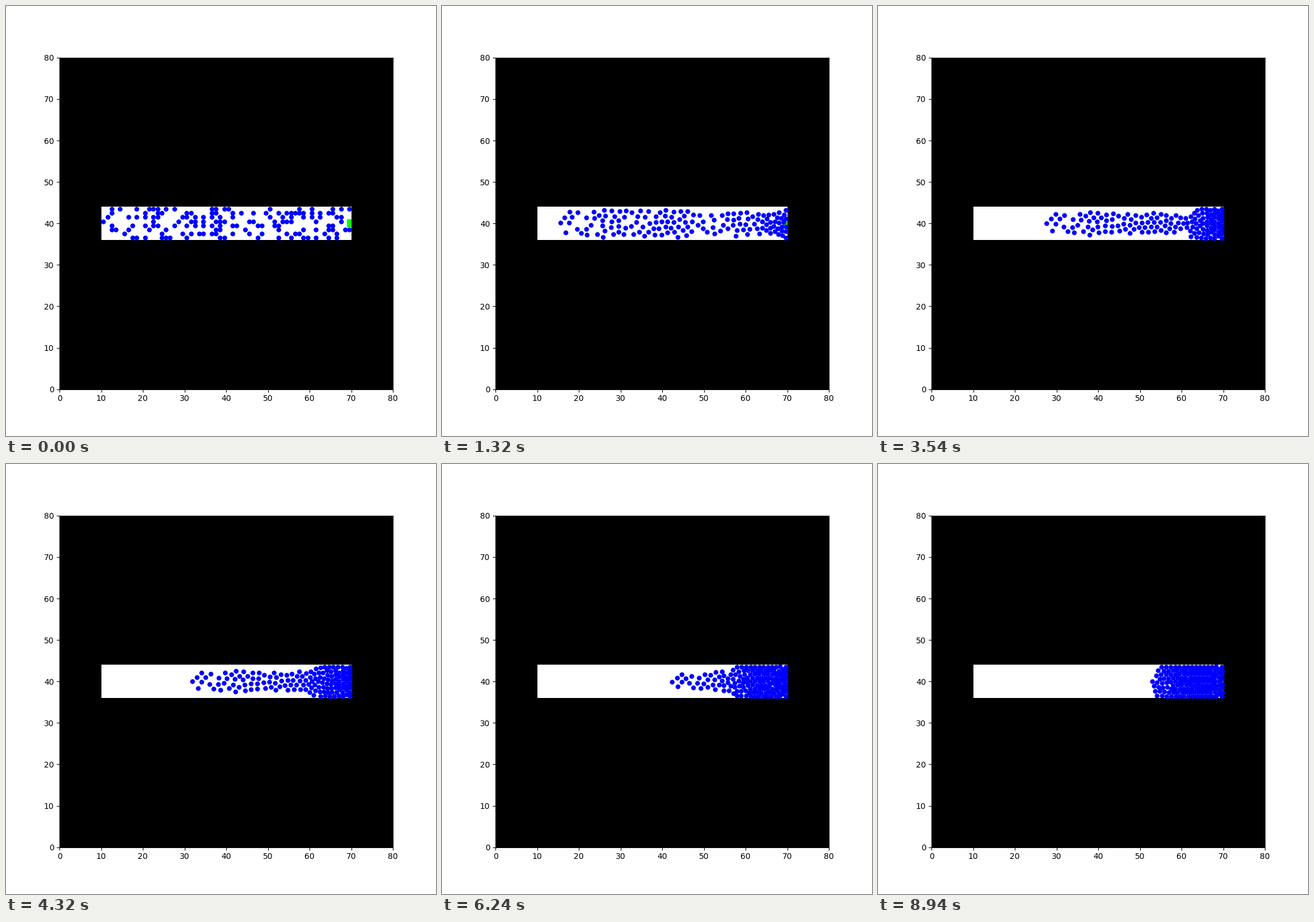
These frames come from a looping animation (748 px wide and 748 px high, 9000 ms). A matplotlib script:

```python
import numpy as np
import matplotlib.pyplot as plt
from matplotlib.animation import FuncAnimation
from matplotlib.patches import Rectangle

SIZE, DPI = 748, 100
FRAMES, INTERVAL, SUBSTEPS = 150, 60, 10
LEFT, RIGHT, BOTTOM, TOP = 10, 70, 36, 44
EXIT = np.array([70.1, 40.0])
SPEED, TAU = 0.331, 6.5          # cells per frame, frames
PUSH = SPEED / TAU
PEOPLE = 145
TAIL = [(10, 40), (11, 41), (12, 38), (12, 39), (12, 42), (12, 43), (13, 38),
        (14, 43)]


def start_positions():
    """A fixed tail, then random free cells; the exit cells stay empty."""
    rng = np.random.default_rng(4)
    cells = [(x, y) for x in range(15, RIGHT) for y in range(BOTTOM, TOP)
             if not (x == RIGHT - 1 and y in (39, 40))]
    chosen = rng.choice(cells, PEOPLE - len(TAIL), replace=False)
    return np.vstack([TAIL, chosen]) + 0.5


def repel(dist, reach, soft):
    return PUSH * np.exp(np.minimum((reach - dist) / soft, 4.5))


def acceleration(pos, vel):
    to_exit = EXIT - pos
    dist = np.linalg.norm(to_exit, axis=1, keepdims=True) + 1e-6
    heading = to_exit / dist
    acc = (SPEED * heading - vel) / TAU
    acc -= heading * repel(dist, 0.8, 0.04)

    gap = pos[:, None] - pos[None]
    d = np.sqrt((gap ** 2).sum(axis=2))
    np.fill_diagonal(d, 99)
    acc += (gap * (repel(d, 1.13, 0.08) / d)[..., None]).sum(axis=1)

    x, y = pos.T
    acc[:, 0] -= repel(RIGHT - x, 0.42, 0.04)
    acc[:, 1] += repel(y - BOTTOM, 0.52, 0.035)
    acc[:, 1] -= repel(TOP - y, 0.52, 0.035)
    return acc


def simulate():
    pos = start_positions()
    vel = np.zeros_like(pos)
    dt = 1 / SUBSTEPS
    path = [pos.copy()]
    for _ in range(FRAMES - 1):
        for _ in range(SUBSTEPS):
            vel += acceleration(pos, vel) * dt
            pos += vel * dt
            pos[:, 0] = np.clip(pos[:, 0], LEFT + 0.4, RIGHT - 0.28)
            pos[:, 1] = np.clip(pos[:, 1], BOTTOM + 0.42, TOP - 0.42)
        path.append(pos.copy())
    return path


def block(ax, x0, y0, x1, y1, color):
    ax.add_patch(Rectangle((x0, y0), x1 - x0, y1 - y0, fc=color, lw=0,
                           snap=True))


path = simulate()

fig = plt.figure(figsize=(SIZE / DPI, SIZE / DPI), dpi=DPI)
ax = fig.add_axes([93.2 / SIZE, 81.4 / SIZE, 580 / SIZE, 576.8 / SIZE])
ax.set_facecolor("black")
ax.set_xlim(0, 80)
ax.set_ylim(0, 80)
block(ax, LEFT, BOTTOM, RIGHT, TOP, "white")
block(ax, RIGHT - 1, 39, RIGHT, 41, "lime")
dots = ax.scatter(*path[0].T, s=36, c="blue", linewidths=0, zorder=3)


def update(i):
    dots.set_offsets(path[i])
    return dots,


anim = FuncAnimation(fig, update, frames=FRAMES, interval=INTERVAL,
                     repeat=True, repeat_delay=0)
plt.show()
```
